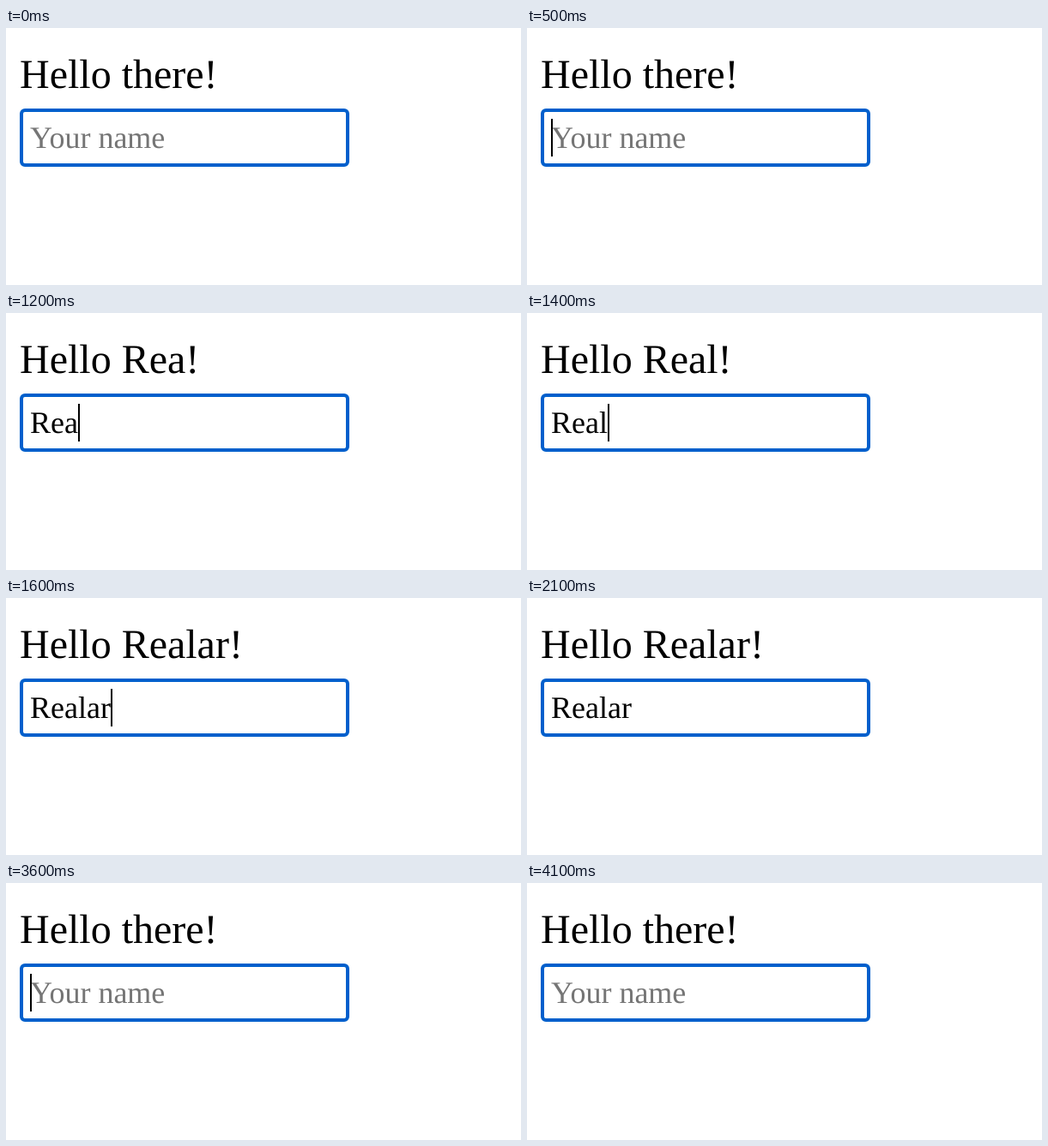
An HTML page for the animation above (4.2 s loop, 600 by 300 pixels).

```html
<!DOCTYPE html>
<html lang="en">
<head>
<meta charset="utf-8">
<title>Greeting input</title>
<style>
  html, body { margin: 0; width: 100%; height: 100%; overflow: hidden; background: #fff; }
  svg { display: block; }
  text {
    font-family: "Liberation Serif", "Times New Roman", Times, serif;
    font-kerning: normal;
    text-rendering: geometricPrecision;
    white-space: pre;
  }
  #greeting { font-size: 48px; }
  #value, #hint { font-size: 36px; }
  #hint { fill: #757575; }
  #field { fill: #fff; stroke: #005fcc; stroke-width: 4; }
  #selection { fill: #b3d7ff; }
</style>
</head>
<body>
<svg width="600" height="300" viewBox="0 0 600 300">
  <text id="greeting" x="16" y="70"></text>
  <rect id="field" x="18" y="96" width="380" height="64" rx="4"/>
  <rect id="selection" x="28" y="106" height="44"/>
  <text id="hint" x="28" y="140">Your name</text>
  <text id="value" x="28" y="140"></text>
  <rect id="caret" y="106" width="2" height="44"/>
</svg>
<script>
  const LOOP = 4200;
  const LEFT = 28;

  // [start ms, typed text, cursor: "caret", "selection" or none]
  const steps = [
    [0, "", ""],
    [500, "", "caret"],
    [800, "R", "caret"],
    [1000, "Re", "caret"],
    [1200, "Rea", "caret"],
    [1400, "Real", "caret"],
    [1500, "Reala", "caret"],
    [1600, "Realar", "caret"],
    [2100, "Realar", ""],
    [2500, "Realar", "selection"],
    [3600, "", "caret"],
    [4100, "", ""]
  ];

  const el = id => document.getElementById(id);
  const [greeting, value, hint, caret, selection] =
    ["greeting", "value", "hint", "caret", "selection"].map(el);
  const show = (node, on) => { node.style.visibility = on ? "visible" : "hidden"; };

  function render([, name, cursor]) {
    greeting.textContent = `Hello ${name || "there"}!`;
    value.textContent = name;
    const width = name ? Math.round(value.getComputedTextLength()) : 0;
    caret.setAttribute("x", LEFT + width);
    selection.setAttribute("width", width);
    show(hint, !name);
    show(caret, cursor === "caret");
    show(selection, cursor === "selection");
  }

  const origin = performance.now();
  let current = steps[0];
  render(current);

  function tick() {
    const time = (performance.now() - origin) % LOOP;
    const step = steps.filter(([start]) => start <= time).pop();
    if (step !== current) render(current = step);
    requestAnimationFrame(tick);
  }
  requestAnimationFrame(tick);
</script>
</body>
</html>
```
